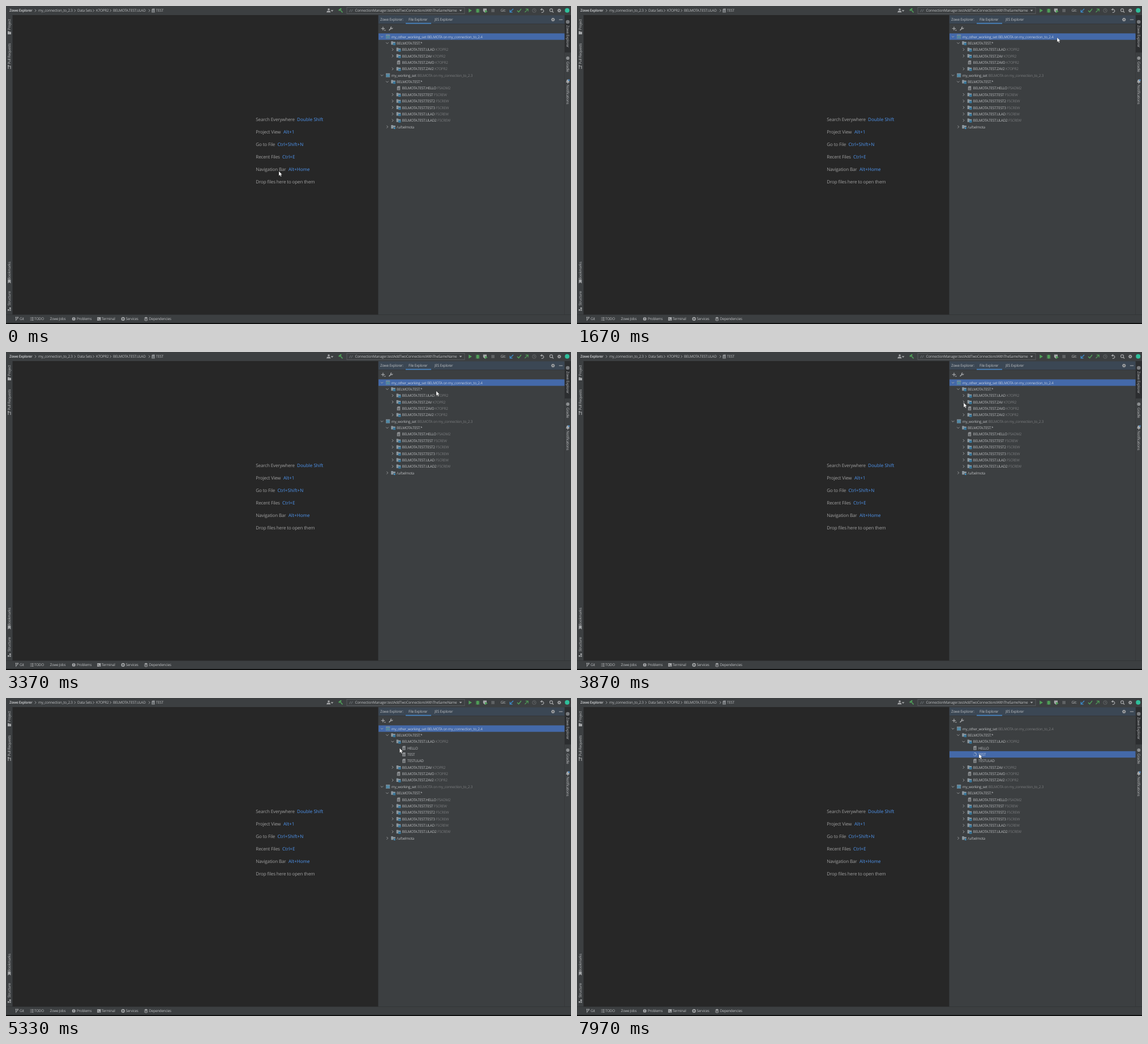
Animation of 998 by 561 pixels, one loop 8 s. Source, as an HTML page with a canvas:

```html
<!DOCTYPE html>
<html lang="en">
<head>
<meta charset="utf-8">
<title>File explorer</title>
<style>
html, body { margin: 0; width: 100%; height: 100%; overflow: hidden; background: #3c3f41; }
canvas { display: block; }
</style>
</head>
<body>
<canvas id="stage" width="998" height="561"></canvas>
<script>
const ctx = document.getElementById('stage').getContext('2d');
const LOOP = 8000, EXPAND = 4640, SELECT = 5930, LOAD = 6100;
const ROW = 11.37, FIRST_ROW = 54;
const BAR = '#3c3f41', EDGE = '#313335', FG = '#bcbec0', DIM = '#7a7c7e', ICON = '#a6a8aa';
const GREEN = '#4f9d58', BLUE = '#3f93c5', LINK = '#4f96f0', SELECTED = '#4469a9';
const FAMILY = '"Open Sans", "Noto Sans", sans-serif';

function rect(x, y, w, h, color) {
  ctx.fillStyle = color;
  ctx.fillRect(x, y, w, h);
}

function poly(points, color) {
  ctx.beginPath();
  points.forEach(([x, y]) => ctx.lineTo(x, y));
  ctx.closePath();
  ctx.fillStyle = color;
  ctx.fill();
}

function line(points, color, width = 1) {
  ctx.beginPath();
  points.forEach(([x, y]) => ctx.lineTo(x, y));
  ctx.strokeStyle = color;
  ctx.lineWidth = width;
  ctx.stroke();
}

function dot(x, y, r, color) {
  ctx.beginPath();
  ctx.arc(x, y, r, 0, Math.PI * 2);
  ctx.fillStyle = color;
  ctx.fill();
}

function ring(x, y, r, color, width = 1, from = 0, to = Math.PI * 2) {
  ctx.beginPath();
  ctx.arc(x, y, r, from, to);
  ctx.strokeStyle = color;
  ctx.lineWidth = width;
  ctx.stroke();
}

// Draws text centred on y and returns the x where it ends.
function text(s, x, y, color = FG, weight = 400, size = 6.4, spacing = -0.26) {
  ctx.font = `${weight} ${size}px ${FAMILY}`;
  ctx.letterSpacing = spacing + 'px';
  ctx.fillStyle = color;
  ctx.fillText(s, x, y + size * 0.36);
  return x + ctx.measureText(s).width;
}

function sideText(s, x, y, turn) {
  ctx.save();
  ctx.translate(x, y);
  ctx.rotate(turn * Math.PI / 2);
  text(s, 0, 0);
  ctx.restore();
}

function caret(x, y, color = ICON) {
  poly([[x - 2.4, y - 1.2], [x + 2.4, y - 1.2], [x, y + 1.6]], color);
}

function chevron(x, y, open) {
  const pts = open ? [[-2.2, -1], [0, 1.2], [2.2, -1]] : [[-1, -2.3], [1.2, 0], [-1, 2.3]];
  line(pts.map(([a, b]) => [x + a, y + b]), '#a2a4a6', 0.9);
}

function gear(x, y) {
  for (let i = 0; i < 4; i++) {
    const a = i * Math.PI / 4, c = Math.cos(a) * 3.3, s = Math.sin(a) * 3.3;
    line([[x - c, y - s], [x + c, y + s]], ICON, 1.2);
  }
  dot(x, y, 2.5, ICON);
  dot(x, y, 1.1, BAR);
}

function wrench(x, y) {
  line([[x - 3, y + 3], [x + 1.2, y - 1.2]], ICON, 1.6);
  ring(x + 1.7, y - 1.5, 1.7, ICON, 1.3, 0, 4.7);
}

function folder(x, y, badge) {
  poly([[x - 3.8, y - 3.2], [x - 0.8, y - 3.2], [x + 0.3, y - 2.1], [x + 3.8, y - 2.1],
    [x + 3.8, y + 3], [x - 3.8, y + 3]], '#8b979f');
  if (badge === 'dot') {
    rect(x + 0.4, y + 0.6, 3.6, 3.2, BAR);
    rect(x + 1, y + 1.2, 2.6, 2.6, BLUE);
  } else {
    rect(x - 0.4, y - 0.2, 4.4, 3.9, '#3a7fa6');
    rect(x - 0.4, y + 1.5, 4.4, 0.5, '#31556c');
  }
}

function fileIcon(x, y) {
  poly([[x - 0.6, y - 3.6], [x + 2.8, y - 3.6], [x + 2.8, y + 3.6], [x - 2.7, y + 3.6], [x - 2.7, y - 1.6]], '#8c8f92');
  poly([[x - 2.7, y - 2.1], [x - 1.1, y - 3.6], [x - 1.1, y - 2.1]], '#a5a7a9');
  rect(x - 1.6, y - 0.3, 3.3, 0.8, '#4b4f52');
  rect(x - 1.6, y + 1.5, 3.3, 0.8, '#4b4f52');
}

function setIcon(x, y) {
  rect(x - 3.6, y - 3.5, 7.2, 7, '#82909a');
  rect(x - 2.9, y - 1.8, 5.8, 4.6, '#397898');
  rect(x - 2.1, y - 0.7, 4.2, 0.7, '#7ba9bf');
  rect(x - 2.1, y + 1, 4.2, 0.7, '#7ba9bf');
}

function spinner(x, y, t) {
  const gap = Math.floor(t / 125) - 2;
  for (let i = 0; i < 8; i++) {
    const a = (gap + i) * Math.PI / 4;
    ring(x, y, 2.7, `rgba(205,214,228,${0.08 + 0.1 * (8 - i) * (i > 0)})`, 1.1, a - 0.4, a + 0.4);
  }
}

function topBar() {
  rect(0, 0, 998, 16, BAR);
  text('Zowe Explorer', 6, 8, '#d0d2d4', 600);
  [['my_connection_to_2.3', 57], ['Data Sets', 126], ['K7OPR2', 159], [`${HLQ}.TEST.ULAD`, 189], ['TEST', 265]]
    .forEach(([s, x]) => text(s, x, 8));
  [52, 121.5, 154.5, 184.5, 253].forEach(x => chevron(x, 8, false));
  fileIcon(260, 8);

  dot(570, 6, 1.8, ICON);
  poly([[566, 11.3], [567.4, 8.5], [572.2, 8.5], [573.5, 11.3]], ICON);
  caret(576, 8.4);
  line([[589.8, 6.2], [594.5, 11.4]], GREEN, 1.6);
  line([[587.8, 8], [592.2, 4.4]], GREEN, 2.4);

  ctx.strokeStyle = '#5d6063';
  ctx.lineWidth = 0.8;
  ctx.strokeRect(602, 2.4, 208, 11.2);
  line([[606.5, 10.5], [609, 6]], '#6f7579', 1);
  line([[609.7, 10.5], [612.2, 6]], '#6f7579', 1);
  text('ConnectionManager.testAddTwoConnectionsWithTheSameName', 616.5, 8);
  caret(803, 8);

  poly([[817.3, 4.5], [823, 8], [817.3, 11.5]], GREEN);
  for (const dy of [-2.2, 0.3, 2.8]) line([[829.5, 8 + dy], [836.8, 8 + dy]], GREEN, 0.8);
  ctx.beginPath();
  ctx.ellipse(833.2, 8.2, 2.4, 3.5, 0, 0, Math.PI * 2);
  ctx.fillStyle = GREEN;
  ctx.fill();
  poly([[842.8, 4.5], [849, 4.5], [849, 8.5], [846, 11.7], [842.8, 9]], ICON);
  poly([[846, 6.8], [850.8, 9.5], [846, 12.3]], GREEN);
  rect(857.3, 5.2, 5.6, 5.6, '#606365');

  text('Git:', 873.5, 8);
  line([[896, 5], [890.6, 10.4]], '#3d91d5', 1.2);
  line([[890.2, 6.7], [890.2, 10.8], [894.5, 10.8]], '#3d91d5', 1.2);
  line([[903, 8], [905.6, 10.6], [910, 5]], GREEN, 1.5);
  line([[916.5, 11], [921.8, 5.7]], GREEN, 1.2);
  line([[917.8, 5.3], [922.2, 5.3], [922.2, 9.6]], GREEN, 1.2);
  ring(933, 8, 3.3, '#66696b', 0.9);
  line([[933, 6], [933, 8.3], [934.6, 8.3]], '#66696b', 0.9);
  ring(947, 8.7, 2.7, ICON, 1.1, -2.2, 2);
  poly([[943.4, 6.5], [947, 3.8], [947, 8]], ICON);
  ring(963, 7.4, 2.5, ICON, 1.1);
  line([[964.8, 9.2], [967, 11.5]], ICON, 1.3);
  gear(977.2, 8);
  dot(991.2, 7.8, 4, '#2fbf9b');
}

function sideBars() {
  rect(0, 16, 11, 529, BAR);
  rect(11, 16, 1, 529, EDGE);
  rect(986.5, 16, 11.5, 529, BAR);
  rect(986, 16, 1, 529, EDGE);
  rect(987, 16, 11, 66, '#2c2e30');

  sideText('Project', 6, 42.2, -1);
  sideText('Pull Requests', 6, 102.5, -1);
  sideText('Bookmarks', 6, 482.7, -1);
  sideText('Structure', 6, 528.5, -1);
  poly([[3, 44.5], [5.5, 44.5], [6.3, 45.5], [9, 45.5], [9, 50], [3, 50]], ICON);
  line([[4, 104.5], [4, 111]], ICON, 1.1);
  line([[4.4, 106], [8, 106], [8, 111]], ICON, 1.1);
  dot(4, 105.3, 1.1, ICON);
  poly([[3.3, 482.8], [8.3, 482.8], [8.3, 489.4], [5.8, 487.2], [3.3, 489.4]], ICON);
  rect(5.9, 531.8, 2.8, 2.8, ICON);
  rect(3, 535, 2.6, 2.6, ICON);
  rect(6.4, 535.4, 2.3, 2.3, ICON);

  sideText('Zowe Explorer', 992.3, 34, 1);
  sideText('Gradle', 992.3, 98, 1);
  sideText('Notifications', 992.3, 139, 1);
  dot(992.2, 28, 3.3, '#787b7e');
  dot(992.3, 92, 3, '#8b8e90');
  poly([[989.3, 135], [990.4, 130.5], [992.3, 129.3], [994.2, 130.5], [995.3, 135]], ICON);
  dot(992.3, 135.8, 1.1, ICON);
  dot(994.3, 130.7, 1.5, '#4c8bc4');
}

function bottomBar() {
  rect(0, 545, 998, 15, BAR);
  rect(0, 544.3, 998, 0.8, EDGE);
  rect(0, 559.4, 998, 1.6, '#050505');
  const y = 552;
  [['Git', 24], ['TODO', 50], ['Zowe Jobs', 77.5], ['Problems', 125], ['Terminal', 168.7], ['Services', 211.5], ['Dependencies', 252.5]]
    .forEach(([s, x]) => text(s, x, y));
  line([[17.7, 549], [17.7, 555.3]], ICON, 1);
  line([[20.8, 549], [20.8, 551.3], [17.7, 553.4]], ICON, 1);
  dot(17.7, 549.4, 1.1, ICON);
  dot(20.8, 549.4, 1.1, ICON);
  for (const dy of [-2.3, 0, 2.3]) {
    rect(42.8, y + dy - 0.5, 1.1, 1, ICON);
    rect(44.7, y + dy - 0.5, 4, 1, ICON);
  }
  dot(119.7, y, 3, ICON);
  rect(119.2, 549.9, 1, 2.6, BAR);
  rect(119.2, 553.2, 1, 1, BAR);
  rect(161, 549, 6.4, 6, ICON);
  line([[162, 550.5], [163.5, 552], [162, 553.5]], BAR, 0.8);
  line([[164, 553.7], [166.3, 553.7]], BAR, 0.8);
  dot(206.7, y, 3.2, ICON);
  poly([[205.6, 550], [208.7, 552], [205.6, 554]], BAR);
  poly([[244, 550.3], [247.3, 548.6], [250.6, 550.3], [247.3, 552]], ICON);
  for (const dy of [0, 1.8]) line([[244, 552 + dy], [247.3, 553.7 + dy], [250.6, 552 + dy]], ICON, 0.9);
}

function welcome() {
  rect(12, 16, 645, 528.5, '#272727');
  [['Search Everywhere', 'Double Shift', 514], ['Project View', 'Alt+1', 490],
    ['Go to File', 'Ctrl+Shift+N', 479.5], ['Recent Files', 'Ctrl+E', 488],
    ['Navigation Bar', 'Alt+Home', 499], ['Drop files here to open them', '', 0]]
    .forEach(([label, keys, x], i) => {
      const y = 199.8 + i * 22.15;
      text(label, 441.3, y, '#a0a0a0', 400, 8.1, -0.17);
      text(keys, x, y, LINK, 400, 8.1, 0);
    });
}

function panelHead() {
  rect(657, 16, 1, 529, EDGE);
  rect(658, 16, 328.5, 529, BAR);
  rect(658, 16.5, 328.5, 15, '#3b4754');
  rect(658, 31.4, 328.5, 0.7, EDGE);
  text('Zowe Explorer:', 661, 24);
  text('File Explorer', 711, 24);
  text('JES Explorer', 757, 24);
  rect(706, 29.8, 45, 1.7, '#4a88c7');
  gear(966.2, 24);
  rect(976.8, 23.5, 6.4, 1.1, ICON);
  rect(662.7, 39.2, 6.4, 1.2, ICON);
  rect(665.3, 36.6, 1.2, 6.4, ICON);
  poly([[667.7, 42.3], [671, 42.3], [669.3, 44]], ICON);
  wrench(679.5, 40);
}

// Row: indent level, arrow ('v' open, '>' closed, '' none), icon, name, suffix
const HLQ = 'BELMOTA';
const ds = (name, owner, arrow = '>') => [2, arrow, arrow ? folder : fileIcon, `${HLQ}.TEST.${name}`, owner];
const mask = [1, 'v', folder, `${HLQ}.TEST.*`, ''];
const members = ['HELLO', 'TEST', 'TESTULAD'].map(name => [3, '', fileIcon, name, '']);

function treeRows(open) {
  const a = 'K7OPR2', b = 'F5CREW';
  return [
    [0, 'v', setIcon, 'my_other_working_set', `${HLQ} on my_connection_to_2.4`],
    mask,
    ds('ULAD', a, open ? 'v' : '>'),
    ...(open ? members : []),
    ds('ZAV', a), ds('ZAVD', a, ''), ds('ZAV2', a),
    [0, 'v', setIcon, 'my_working_set', `${HLQ} on my_connection_to_2.3`],
    mask,
    ds('HELLO', 'F5ADM2', ''),
    ...['TEST', 'TEST2', 'TEST3', 'ULAD', 'ULAD2'].map(name => ds(name, b)),
    [1, '>', folder, '/u/' + HLQ.toLowerCase(), '', 'dot']
  ];
}

function tree(t) {
  const current = t < SELECT ? 0 : 4;
  treeRows(t >= EXPAND).forEach(([level, arrow, icon, name, suffix, badge], i) => {
    const y = FIRST_ROW + i * ROW, x = 664 + level * 9.4, on = i === current;
    if (on) rect(658, y - ROW / 2, 328.5, ROW, SELECTED);
    if (arrow) chevron(x, y, arrow === 'v');
    if (i === 4 && t >= LOAD) spinner(x + 10.6, y, t);
    else icon(x + 10.6, y, badge);
    const end = text(name, x + 16.7, y + 0.2, on ? '#c6cfdd' : FG);
    text(suffix, end + 1.7, y + 0.2, on ? '#bdc9dc' : DIM);
  });
}

// Pointer keys: time, x, y
const PATH = [
  [0, 482, 291], [30, 482, 291], [400, 655, 186], [730, 779, 112], [870, 804, 84],
  [1250, 835, 60], [1670, 848, 55], [2000, 851, 58], [2500, 820, 59], [3000, 820, 59],
  [3500, 735, 73], [3870, 683, 89], [3970, 681.5, 88.6], [4250, 681.5, 88.6],
  [4520, 683, 76], [5070, 684, 77], [5330, 695.3, 88], [5870, 707.5, 97], [5930, 710, 98], [8000, 710, 98]
];

const slope = (i, k) => (PATH[i + 1][k] - PATH[i][k]) / (PATH[i + 1][0] - PATH[i][0]);

function tangent(i, k) {
  if (i === 0 || i === PATH.length - 1) return 0;
  const a = slope(i - 1, k), b = slope(i, k);
  return a * b <= 0 ? 0 : 2 * a * b / (a + b);
}

// Monotone cubic through the keys
function along(t, k) {
  let i = 0;
  while (i < PATH.length - 2 && t >= PATH[i + 1][0]) i++;
  const span = PATH[i + 1][0] - PATH[i][0], u = (t - PATH[i][0]) / span;
  const p = PATH[i][k], q = PATH[i + 1][k], v = 1 - u;
  return p * v * v * (1 + 2 * u) + q * u * u * (3 - 2 * u)
    + span * u * v * (tangent(i, k) * v - tangent(i + 1, k) * u);
}

function pointer(t) {
  ctx.save();
  ctx.translate(along(t, 1), along(t, 2) + 0.4);
  const shape = [[0, 0], [0, 8.4], [1.9, 6.7], [3.2, 9.5], [4.6, 8.9], [3.3, 6.2], [5.8, 6]];
  poly(shape, '#ffffff');
  line([...shape, shape[0]], 'rgba(20,20,20,0.7)', 0.4);
  ctx.restore();
}

function draw(t) {
  ctx.textRendering = 'geometricPrecision';
  rect(0, 0, 998, 561, EDGE);
  welcome();
  topBar();
  sideBars();
  panelHead();
  tree(t);
  bottomBar();
  pointer(t);
}

const start = performance.now();
function tick() {
  draw((performance.now() - start) % LOOP);
  requestAnimationFrame(tick);
}
draw(0);
requestAnimationFrame(tick);
</script>
</body>
</html>
```
